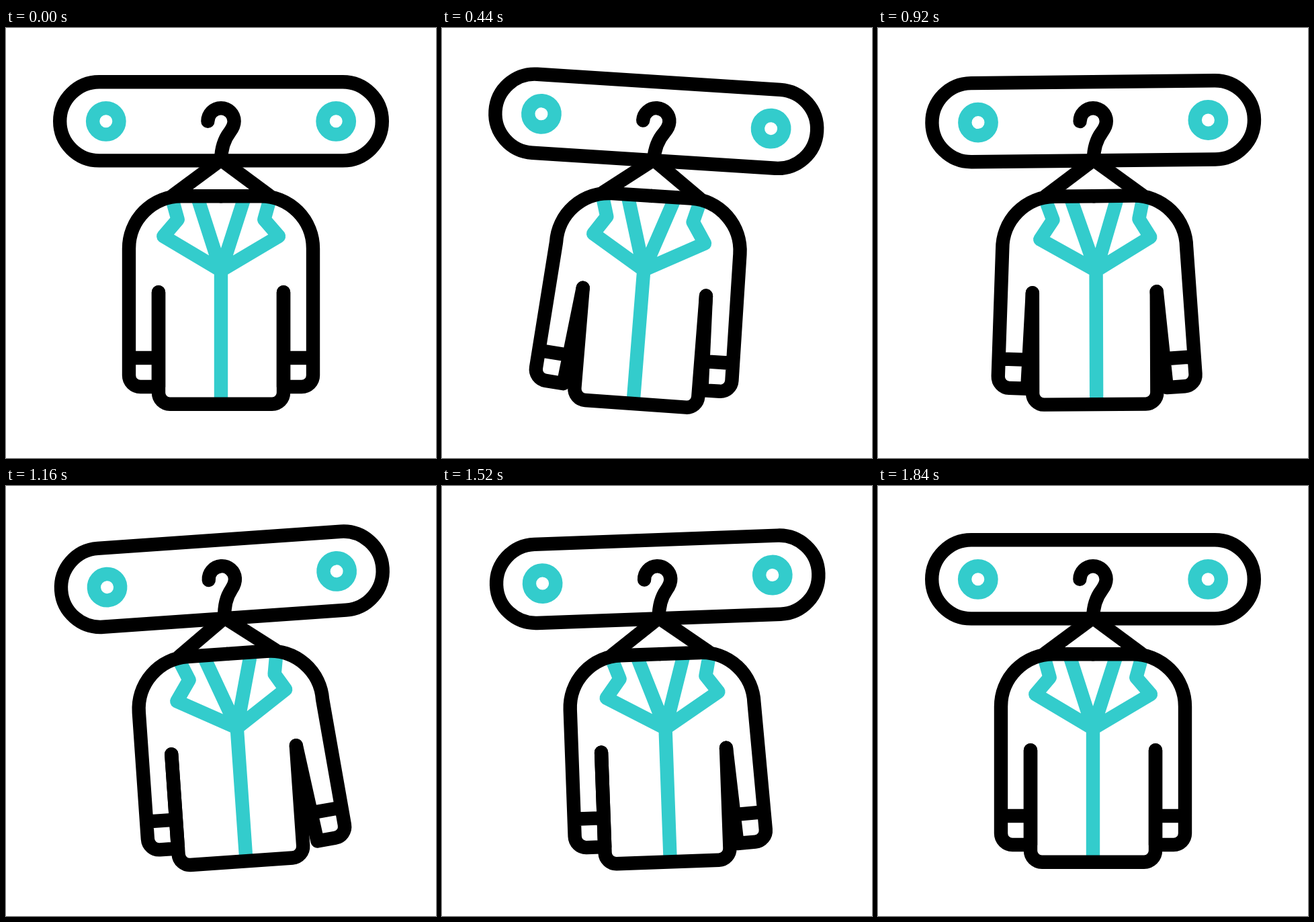
An HTML page with a canvas for the animation above (2 s loop, 640 px wide and 640 px high).

```html
<!DOCTYPE html>
<html lang="en">
<head>
<meta charset="utf-8">
<title>Swinging jacket</title>
<style>
  html, body { margin: 0; width: 100%; height: 100%; overflow: hidden; background: #fff; }
  canvas { display: block; width: 640px; height: 640px; }
</style>
</head>
<body>
<canvas id="stage" width="640" height="640"></canvas>
<script>
const ctx = document.getElementById('stage').getContext('2d');
const BLACK = '#000', TEAL = '#33cccc';
const DEG = Math.PI / 180;
const LOOP = 2000, STEP = 40, PIVOT_Y = 119.5;

function ease(t, from, to) {
  const p = Math.min(1, Math.max(0, (t - from) / (to - from)));
  return p * p * (3 - 2 * p);
}

function stroke(color, cap, build) {
  ctx.strokeStyle = color;
  ctx.lineCap = cap;
  ctx.beginPath();
  build();
  ctx.stroke();
}

function polyline(...points) {
  points.forEach(([x, y], i) => i ? ctx.lineTo(x, y) : ctx.moveTo(x, y));
}

function drawRack() {
  stroke(BLACK, 'butt', () => ctx.roundRect(-239.8, 80.2, 479.6, 117.2, 58.6));
  for (const x of [-171.2, 171.2]) {
    stroke(TEAL, 'butt', () => ctx.arc(x, 138.8, 19.7, 0, 2 * Math.PI));
  }
}

function drawHanger() {
  stroke(BLACK, 'round', () => {
    ctx.arc(0, 138.8, 19.6, Math.PI, 0);
    ctx.bezierCurveTo(19.6, 146, 16, 151, 13, 155);
    ctx.bezierCurveTo(6, 164, 0.5, 176, 0, 196.3);
    polyline([-72, 249.5], [0, 196.3], [72, 249.5]);
  });
}

// left and right: how far the cloth is in each swung pose, 0 to 1
function drawLapels(left, right) {
  const v = [7 * right - 4.7 * left, 361];
  stroke(TEAL, 'butt', () => {
    polyline([-74, 250], [-64.3 + 5.3 * right, 285],
      [-85.7 + 3.2 * left + 6.2 * right, 310 + 1.8 * left + 5.3 * right], v,
      [86 - 2.5 * left - 2.8 * right, 310 + 6.3 * left - right],
      [64.3 + 4 * right, 285], [74, 250]);
    polyline([-35.7, 250], v, [35.7, 250]);
    polyline(v, [7 * right - 8.2 * left, 560]);
  });
}

function drawSleeve(side, flare, arm) {
  ctx.save();
  ctx.scale(side, 1);
  stroke(BLACK, 'round', () => {
    ctx.moveTo(0, 250.2);
    ctx.arcTo(137, 250.2, 137, 328.2, 78);
    ctx.lineTo(137, 328);
    ctx.save();
    ctx.translate(137, 328);
    ctx.rotate(-6 * DEG * flare);
    ctx.translate(-137, -328);
    ctx.arcTo(137, 534, 93, 534, 17);
    ctx.lineTo(93, 534);
    ctx.restore();
    ctx.lineTo(arm, 393.3);
    ctx.translate(137, 328);
    ctx.rotate(-6 * DEG * flare);
    ctx.translate(-137, -328);
    polyline([137, 491], [93, 491]);
  });
  ctx.restore();
}

function drawBody(left, arm) {
  const x1 = -93 - 3.5 * left, x2 = 93 - 5.2 * left;
  const y2 = 559.8 + 1.5 * left;
  stroke(BLACK, 'round', () => {
    ctx.moveTo(-93, 393.3);
    ctx.arcTo(x1, 559.8, x2, y2, 17);
    ctx.arcTo(x2, y2, arm, 393.3, 17);
    ctx.lineTo(arm, 393.3);
  });
}

function draw(t) {
  const across = ease(t, 608, 1175);
  const left = ease(t, 80, 520) - across;
  const right = across - ease(t, 1220, 1840);
  const arm = 93 - 2.6 * left;

  ctx.setTransform(1, 0, 0, 1, 0, 0);
  ctx.fillStyle = '#fff';
  ctx.fillRect(0, 0, 640, 640);
  ctx.lineWidth = 20.4;
  ctx.lineJoin = 'round';
  ctx.translate(320, PIVOT_Y);
  ctx.rotate(4 * DEG * (left - right));
  ctx.translate(0, -PIVOT_Y);

  drawRack();
  drawLapels(left, right);
  drawHanger();
  drawSleeve(-1, left, 93);
  drawSleeve(1, right, arm);
  drawBody(left, arm);
}

function tick() {
  const t = performance.now() % LOOP;
  draw(Math.floor(t / STEP) * STEP);
  requestAnimationFrame(tick);
}
tick();
</script>
</body>
</html>
```
